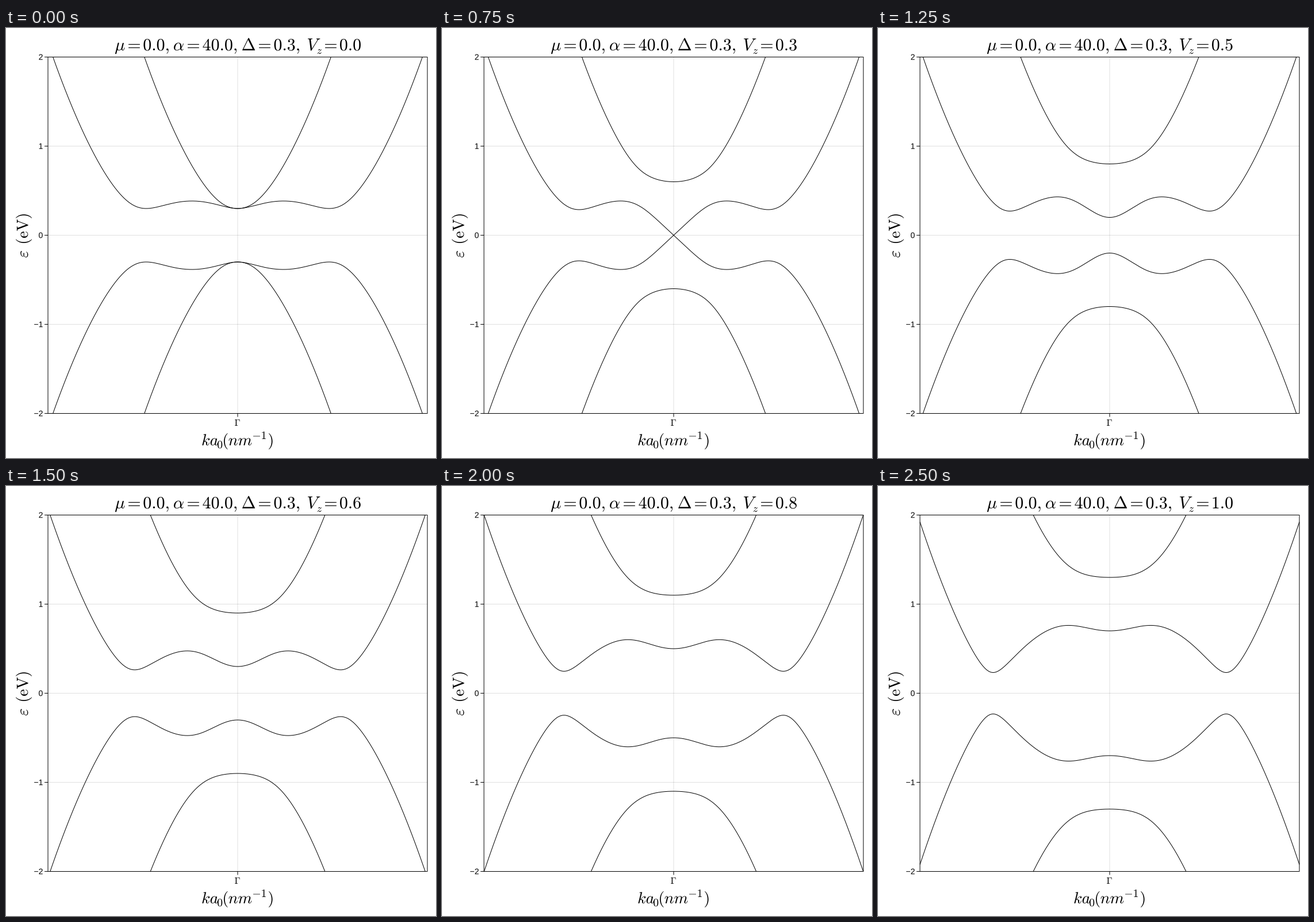
A matplotlib script that plays this animation: 748 px wide and 748 px high, repeating every 2.75 s.

```python
import numpy as np
import matplotlib.pyplot as plt
from matplotlib.animation import FuncAnimation
from matplotlib.patches import PathPatch, Rectangle
from matplotlib.textpath import TextPath
from matplotlib.transforms import Affine2D

plt.rcParams.update({
    "font.family": "Liberation Sans",
    "mathtext.fontset": "cm",
})

SIZE, DPI = 748, 100
PX = 72 / DPI                      # one pixel in points
LEFT, RIGHT, TOP, BOTTOM = 73, 733, 50.5, 670.5
MID_X, MID_Y = (LEFT + RIGHT) / 2, (TOP + BOTTOM) / 2
UNIT = 155                         # pixels per eV

STEPS, INTERVAL = 11, 250
GAP = 0.3                          # pairing gap
SPIN_ORBIT = 0.96                  # spin-orbit energy at K0
K0 = 159.1                         # spin-orbit momentum in pixels

fig = plt.figure(figsize=(SIZE / DPI, SIZE / DPI), dpi=DPI, facecolor="white")
ax = fig.add_axes([0, 0, 1, 1])
ax.set_xlim(0, SIZE)
ax.set_ylim(SIZE, 0)
ax.axis("off")


def glyph_path(text, x, y, size, angle=0, ref=None, right=False):
    """Outline of text whose ink (or that of ref) starts or ends at x."""
    ink = TextPath((0, 0), ref or text, size=size).get_extents()
    place = Affine2D().translate(-ink.x1 if right else -ink.x0, 0)
    place.scale(1, -1).rotate_deg(-angle).translate(x, y)
    return TextPath((0, 0), text, size=size).transformed(place)


def glyphs(*args, **kwargs):
    patch = PathPatch(glyph_path(*args, **kwargs), fc="black", lw=0,
                      snap=False, zorder=4)
    return ax.add_patch(patch)


def line(xs, ys, **style):
    style = {"color": "black", "lw": PX, "solid_capstyle": "butt",
             "snap": False, **style}
    return ax.plot(xs, ys, **style)[0]


def bands(field):
    """Positive quasiparticle energies, lower and upper, along k."""
    kinetic = SPIN_ORBIT * (k / K0) ** 2
    rashba = SPIN_ORBIT * k / K0
    base = field**2 + GAP**2 + kinetic**2 + rashba**2
    mix = 2 * np.sqrt((field * GAP) ** 2 + kinetic**2 * (field**2 + rashba**2))
    return [np.sqrt(np.maximum(base + s * mix, 0)) for s in (-1, 1)]


def value_path(field):
    return glyph_path(f"${field:.1f}$", 581, 39, 30, ref="$0$")


# Grid, frame and ticks
grid = {"color": (0, 0, 0, 0.12), "zorder": 1}
for e in (-1, 0, 1):
    line([LEFT, RIGHT], [MID_Y - e * UNIT] * 2, **grid)
line([MID_X, MID_X], [TOP, BOTTOM], **grid)

frame = ax.add_patch(Rectangle((LEFT, TOP), RIGHT - LEFT, BOTTOM - TOP,
                               fc="none", ec="black", lw=PX, snap=False,
                               zorder=3))

for e in range(-2, 3):
    y = MID_Y - e * UNIT
    line([LEFT - 6, LEFT], [y, y])
    glyphs(str(e).replace("-", "\u2212"), 63.7, y + 4.8, 14, right=True)
line([MID_X, MID_X], [BOTTOM, BOTTOM + 6])
glyphs(r"$\Gamma$", 398, 692, 16)

# Title
for text, x in [(r"$\mu$", 190), ("$=$", 213), ("$0.0,$", 239.4),
                (r"$\alpha$", 292), ("$=$", 316), ("$40.0,$", 342.4),
                (r"$\Delta$", 411), ("$=$", 440), ("$0.3,$", 466.6),
                ("$V$", 525), ("$=$", 555)]:
    glyphs(text, x, 39, 30)
glyphs("$z$", 541.5, 45, 18)
value = ax.add_patch(PathPatch(value_path(0), fc="black", lw=0, snap=False,
                               zorder=4))

# Axis labels
for text, x in [("$ka$", 341.5), ("$($", 379), ("$nm$", 387.5), ("$)$", 457)]:
    glyphs(text, x, 726, 28)
glyphs("$0$", 368, 731, 19.6)
glyphs("$-1$", 430, 715, 19.6)
glyphs(r"$\varepsilon$", 38, 399, 28, angle=90)
glyphs(r"$\mathrm{(eV)}$", 38, 374, 28, angle=90)

# Bands
k = np.linspace(LEFT - MID_X, RIGHT - MID_X, 661)
curves = [line(k + MID_X, k, zorder=2, solid_joinstyle="round")
          for _ in range(4)]
for curve in curves:
    curve.set_clip_path(frame)


def update(step):
    field = step / 10
    energies = bands(field)
    for curve, energy in zip(curves, energies + [-e for e in energies]):
        curve.set_ydata(MID_Y - UNIT * energy)
    value.set_path(value_path(field))
    return [*curves, value]


anim = FuncAnimation(fig, update, frames=STEPS, interval=INTERVAL,
                     repeat=True, repeat_delay=0, blit=False)
plt.show()
```
